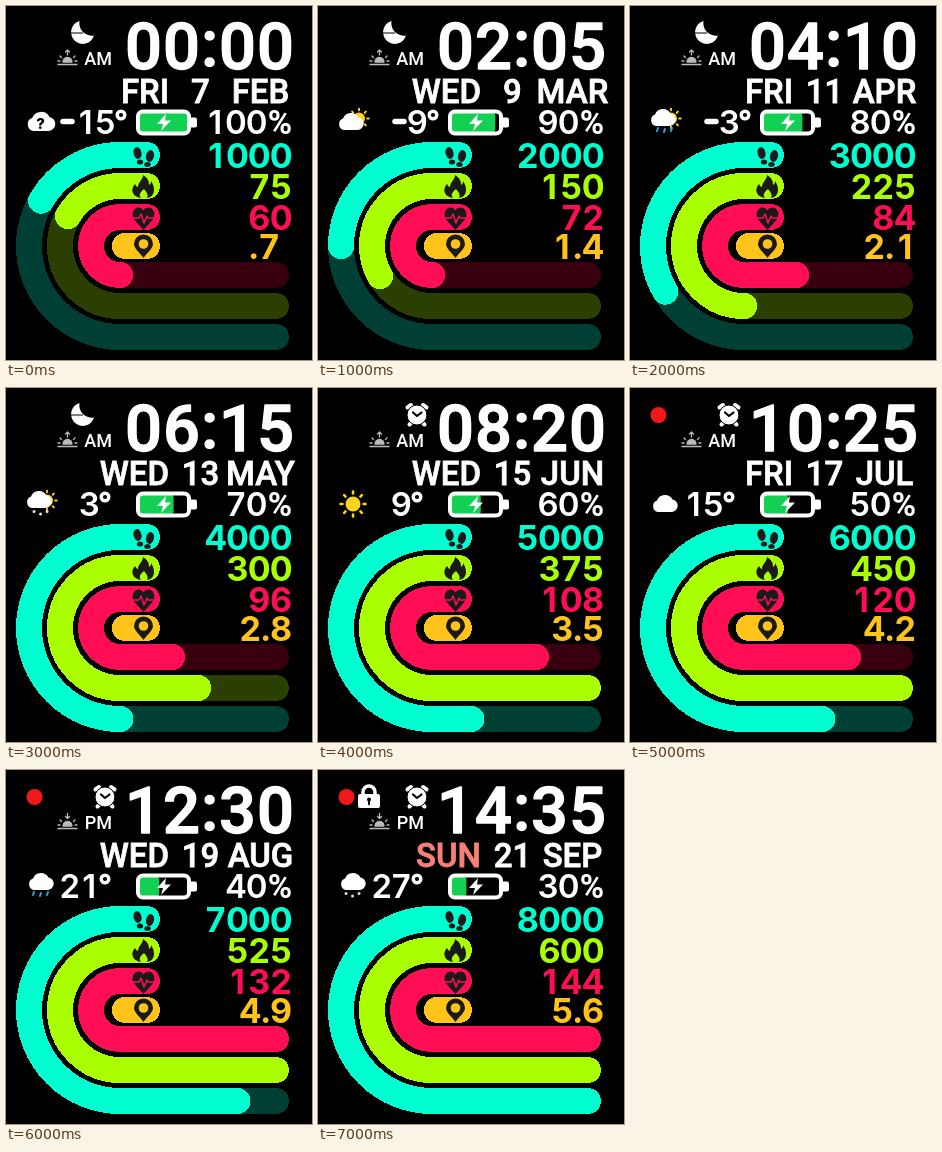
An HTML page for the animation above (8 s loop, 306 by 354 pixels).

```html
<!DOCTYPE html>
<html lang="en">
<head>
<meta charset="utf-8">
<title>Watch face</title>
<style>
  html, body { margin: 0; width: 100%; height: 100%; overflow: hidden; background: #000; }
  svg { display: block; width: 306px; height: 354px; }
  text { fill: #fff; text-anchor: end; }
  .din { font-family: Roboto, sans-serif; font-weight: 500; }
  .num { font-family: Inter, sans-serif; font-weight: 600; font-size: 33px; text-anchor: middle; }
  .val { font-weight: 700; font-size: 34px; }
  .date { font-size: 33px; stroke: currentColor; stroke-width: .8; color: #fff; fill: currentColor; }
  .mid { text-anchor: middle; }
  #time { font-size: 65px; letter-spacing: 1px; stroke: #fff; stroke-width: 1.4; stroke-linejoin: round; }
  .ring { fill: none; stroke-width: 26; stroke-linecap: round; }
  .line { fill: none; stroke: #fff; stroke-linecap: round; stroke-linejoin: round; }
</style>
</head>
<body>
<svg viewBox="0 0 306 354">
  <defs>
    <path id="cloud" d="M28 124a6 6 0 0 1-1-11.500a8.500 8.500 0 0 1 15.500-1a6.300 6.300 0 0 1-1 12.500z"/>
    <g id="rays" stroke="#ffd21f" stroke-width="2.500" stroke-linecap="round"></g>
  </defs>

  <!-- status icons -->
  <g id="moon">
    <path fill="#fff" d="M73.500 15A11.700 11.700 0 1 0 88 29.500A12.500 12.500 0 0 1 73.500 15z"/>
    <path d="M63 26.500h14v1h-14z"/>
  </g>
  <circle id="link" cx="28.500" cy="27" r="8" fill="#f01818"/>
  <g id="lock">
    <path class="line" stroke-width="3.500" d="M45 26v-4a6 6 0 0 1 12 0v4"/>
    <rect x="40" y="24" width="22" height="14" rx="2" fill="#fff"/>
    <circle cx="51" cy="29.500" r="2"/><path d="M50 30h2v5h-2z"/>
  </g>
  <g id="alarm" class="line">
    <path stroke-width="4" d="M89.500 19.500l3.500-2.500M108.500 19.500l-3.500-2.500M93 35l-1.500 1.500M105 35l1.500 1.500"/>
    <circle cx="99" cy="27" r="10" fill="#fff" style="stroke:#000"/>
    <path stroke-width="2.200" style="stroke:#000" d="M95 24.500l4 3.500l4.500-3.500"/>
  </g>
  <g class="line" stroke-width="1.300" style="stroke:#bbb">
    <path fill="#bbb" d="M57 56a4.500 4.500 0 0 1 9 0z"/>
    <path d="M52 58.500h19M52 55h2M69 55h2M54 50l1.500 1.500M69 50l-1.500 1.500"/>
    <path id="rise" d="M61.500 49v-5M59.500 46l2-2l2 2"/>
    <path id="set" d="M61.500 43.500v5M59.500 46.500l2 2l2-2"/>
  </g>
  <text id="half" class="din" x="106" y="59" font-size="18"></text>

  <text id="time" class="din" x="289" y="62.500"><tspan id="hour"></tspan><tspan dy="-3">:</tspan><tspan id="min" dy="3"></tspan></text>
  <text id="week" class="din date" x="163" y="97"></text>
  <text id="day" class="din date mid" x="194.500" y="97"></text>
  <text id="month" class="din date mid" x="254.500" y="97"></text>

  <!-- weather -->
  <g id="sun">
    <circle cx="35" cy="116" r="7.500" fill="#ffd21f"/>
    <use href="#rays" x="35" y="116"/>
  </g>
  <g id="peek">
    <circle cx="41" cy="112.500" r="6" fill="#ffd21f"/>
    <use href="#rays" transform="translate(41 112.500) scale(.78)"/>
  </g>
  <use id="sky" href="#cloud" fill="#fff"/>
  <text id="ask" class="mid" x="34.500" y="123" font-family="Inter, sans-serif" font-weight="800" font-size="15" style="fill:#000">?</text>
  <path id="rain" class="line" style="stroke:#29a5e8" stroke-width="2" d="M28 122l-1 3M35 123l-1 3M42 122l-1 3"/>
  <path id="snow" class="line" style="stroke:#ddd" stroke-width="3" d="M28 123.500h.1M34.500 126h.1M41 123.500h.1"/>

  <g id="temp">
    <path id="minus" class="line" stroke-width="5.500"/>
    <text id="deg" class="num" y="128"></text>
    <circle class="line" cx="99" cy="109" r="3.800" stroke-width="3.400"/>
  </g>

  <!-- battery -->
  <rect id="charge" x="134" y="107" height="19" rx="2" fill="#12d052"/>
  <rect class="line" x="132" y="105.500" width="51" height="22" rx="5" stroke-width="4"/>
  <path d="M184 111.500h5a2 2 0 0 1 2 2v6a2 2 0 0 1-2 2h-5z" fill="#fff"/>
  <path d="M160 108l-9 10h6l-2 7l10-10.500h-6z" fill="#fff"/>
  <text id="power" class="num" y="128"></text>
  <text class="din" x="286" y="128" font-size="33" style="font-weight:700">%</text>

  <g shape-rendering="crispEdges">
    <g id="rings"></g>
    <rect x="106" y="227" width="48" height="26" rx="13" fill="#ffc31a"/>
  </g>

  <!-- ring icons -->
  <g fill="#1a1a1a">
    <ellipse cx="131.500" cy="147" rx="4" ry="6" transform="rotate(-12 131.500 147)"/>
    <ellipse cx="134" cy="156" rx="3.200" ry="2.500"/>
    <ellipse cx="144" cy="150" rx="4" ry="6" transform="rotate(12 144 150)"/>
    <ellipse cx="141.500" cy="158.500" rx="3.200" ry="2.500"/>
    <path d="M137 169c6 4 6 7 6 10c2-1 2-3 2-4c5 7 4 16-4 17c2-4-1-6-3-9c-3 3-6 5-3 9c-9-1-11-9-6-14c1 2 2 3 3 3c0-5 5-7 5-12z"/>
    <path d="M137.500 224l-9.500-10.500c-5-8 4-16.500 9.500-9c5.500-7.500 14.500 1 9.500 9z"/>
    <path d="M137.500 252c-3-5-9.500-9-9.500-14a9.500 9.500 0 0 1 19 0c0 5-6.500 9-9.500 14z"/>
  </g>
  <path class="line" style="stroke:#ff0d55" stroke-width="1.500" d="M126 212h7l2-4l3 9l3-7l1 2h7"/>
  <circle cx="137.500" cy="238" r="4.800" fill="#ffc31a"/>

  <text id="steps" class="num val" y="162" style="fill:#00ffd0"></text>
  <text id="energy" class="num val" y="192.500" style="fill:#af0"></text>
  <text id="pulse" class="num val" y="223.500" style="fill:#ff0d55"></text>
  <text id="dist" class="num val" y="252.500" style="fill:#ffc31a"></text>
</svg>
<script>
const $ = id => document.getElementById(id);
const put = (id, text) => { $(id).textContent = text; };
const show = (id, on) => { $(id).style.display = on ? '' : 'none'; };
const two = n => String(n).padStart(2, '0');

const WEEK = ['FRI', 'WED', 'FRI', 'WED', 'WED', 'FRI', 'WED', 'SUN'];
const MONTH = ['FEB', 'MAR', 'APR', 'MAY', 'JUN', 'JUL', 'AUG', 'SEP'];
const WEATHER = ['ask', 'peek', 'peek rain', 'peek snow', 'sun', '', 'rain', 'snow'];

// Each ring gives its swept angle and the length along the lower bar.
const RINGS = [
  { r: 91, color: '#00ffd0', dim: '#004034', at: n => [[60, 90, 120][n] || 180, Math.max(0, n - 3) * 39] },
  { r: 60, color: '#af0', dim: '#2b4000', at: n => [Math.min(180, 60 * (n + 1)), Math.min(156, Math.max(0, n - 2) * 78)] },
  { r: 29, color: '#ff0d55', dim: '#38000e', at: n => [180, Math.floor(n / 2) * 52] }
];

function add(parent, tag, attrs) {
  const el = document.createElementNS('http://www.w3.org/2000/svg', tag);
  for (const k in attrs) el.setAttribute(k, attrs[k]);
  return parent.appendChild(el);
}

// Sets a number in fixed-pitch digits that end at the right edge.
function digits(id, value, right, pitch) {
  const xs = [];
  for (const c of [...String(value)].reverse()) {
    const w = c === '.' ? 9 : pitch;
    xs.unshift(right - w / 2);
    right -= w;
  }
  put(id, value);
  $(id).setAttribute('x', xs.join(' '));
}

for (let a = 0; a < 360; a += 45)
  add($('rays'), 'path', { d: 'M0-10.500v-2', transform: `rotate(${a})` });

for (const ring of RINGS) {
  const { r, color, dim } = ring;
  const arc = `A${r} ${r} 0 0 0 114 ${240 + r}H270`;
  add($('rings'), 'path', { class: 'ring', stroke: dim, d: `M114 ${240 - r}${arc}` });
  ring.bar = add($('rings'), 'path', { class: 'ring', stroke: color, d: `M141 ${240 - r}H114${arc}` });
}

function drawWeather(n) {
  const sky = WEATHER[n].split(' ');
  for (const id of ['ask', 'peek', 'rain', 'snow', 'sun']) show(id, sky.includes(id));
  show('sky', !sky.includes('sun'));
  const wet = sky.includes('rain') || sky.includes('snow');
  const x = sky.includes('peek') ? -2 : 0;
  const size = sky.includes('ask') ? 1.12 : 1;
  $('sky').setAttribute('transform', `translate(${34.5 + x} ${wet ? 112 : 116}) scale(${size}) translate(-34.5 -116)`);
}

function draw(n) {
  put('hour', two(2 * n));
  put('min', two(5 * n));
  put('half', n < 6 ? 'AM' : 'PM');
  show('rise', n < 6);
  show('set', n >= 6);
  show('moon', n < 4);
  show('alarm', n >= 4);
  show('link', n >= 5);
  show('lock', n === 7);

  put('week', WEEK[n]);
  $('week').style.color = WEEK[n] === 'SUN' ? '#f77f78' : '#fff';
  put('day', 7 + 2 * n);
  put('month', MONTH[n]);

  drawWeather(n);
  const temp = 6 * n - 15;
  digits('deg', Math.abs(temp), 93, 19.5);
  show('minus', temp < 0);
  $('minus').setAttribute('d', `M${temp < -9 ? 41 : 61} 115.500h9`);
  $('temp').setAttribute('transform', `translate(${temp < 0 ? 16 : 0})`);

  const power = 100 - 10 * n;
  digits('power', power, 261, 20.7);
  $('charge').setAttribute('width', 0.48 * power);

  digits('steps', 1000 * (n + 1), 286, 21.8);
  digits('energy', 75 * (n + 1), 286, 21.8);
  digits('pulse', 60 + 12 * n, 286, 21.8);
  digits('dist', (0.7 * (n + 1)).toFixed(1).replace(/^0/, ''), n ? 286 : 274, 21.8);

  for (const { r, at, bar } of RINGS) {
    const [angle, rest] = at(n);
    bar.setAttribute('stroke-dasharray', `${27 + r * angle * Math.PI / 180 + rest} 999`);
  }
}

let last = -1;
const start = performance.now();
function tick() {
  const n = Math.floor((performance.now() - start) / 1000) % 8;
  if (n !== last) draw(last = n);
  requestAnimationFrame(tick);
}
tick();
</script>
</body>
</html>
```
